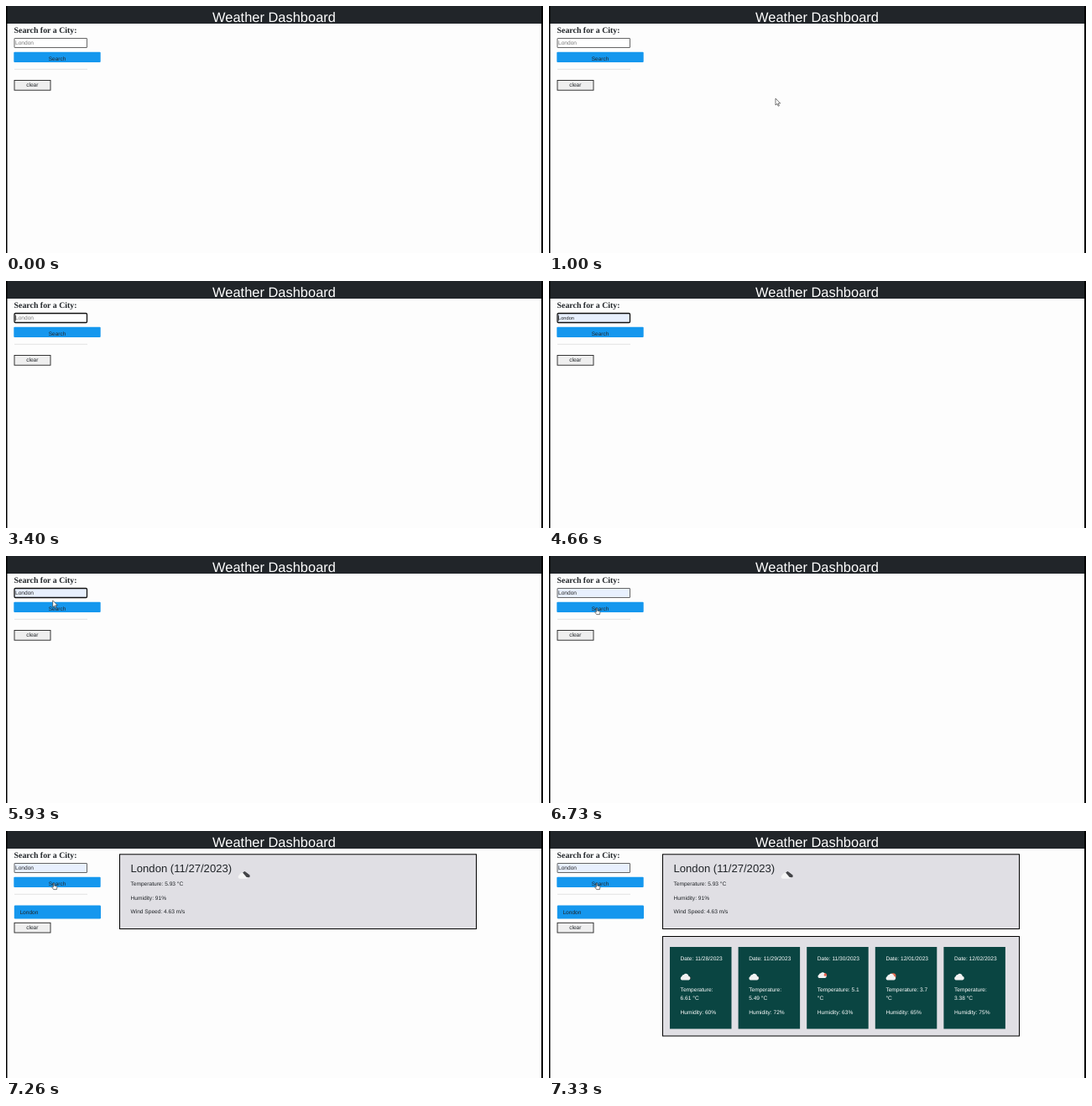
Recreate the animation shown at these times as an HTML page. Size 640 by 294 pixels, loop 8000 ms.

```html
<!DOCTYPE html>
<html lang="en">
<head>
<meta charset="utf-8">
<title>Weather Dashboard</title>
<style>
  html, body { margin: 0; width: 100%; height: 100%; overflow: hidden; background: #fdfdfd; }
  svg { display: block; width: 640px; height: 294px; }
  text { font-family: "Liberation Sans", Arial, sans-serif; font-size: 6.6px; fill: #212529; text-rendering: geometricPrecision; }
  .serif { font: bold 9.9px "Liberation Serif", "Times New Roman", serif; }
  .tile text { fill: #fff; }
  .mid { text-anchor: middle; }
  .button { fill: #1597ee; }
  .panel { fill: #e0dfe4; stroke: #000; }
</style>
</head>
<body>
<svg viewBox="0 0 640 294">
  <defs>
    <path id="cloud" d="M2.6 9.5a2.5 2.5 0 0 1 0-4.6 2.4 2.4 0 0 1 2.4-1.9 3.2 3.2 0 0 1 5.7 1.8 2.4 2.4 0 0 1 .2 4.7z"/>
  </defs>
  <rect width="640" height="294" fill="#fdfdfd"/>
  <rect width="640" height="21" fill="#212529"/>
  <path d="M0 0h1.5v294H0zM638 0h2v294h-2z"/>
  <text class="mid" x="319.5" y="19" style="font-size:16.45px;fill:#fff">Weather Dashboard</text>
  <text class="serif" x="9.5" y="32.2">Search for a City:</text>

  <rect id="field" x="10" y="38.5" width="86.5" height="11"/>
  <text id="value" x="11" y="46.3">London</text>
  <path id="caret" d="M11.5 40.5v7" stroke="#000" stroke-width=".6"/>

  <rect class="button" x="9.3" y="54.7" width="103.4" height="12.3" rx="1"/>
  <text class="mid" x="61" y="64.6" style="font-size:6.5px">Search</text>
  <path d="M10 75.3h87" stroke="#dcdcdc" stroke-width=".8"/>

  <g id="history">
    <rect class="button" x="9.8" y="88.5" width="103.2" height="16" rx="1.2"/>
    <text x="16.4" y="99.2">London</text>
  </g>
  <g id="clear">
    <rect x="10" y="88.5" width="43" height="11.7" fill="#efefef" stroke="#222" stroke-width=".9"/>
    <text class="mid" x="31.3" y="96.3">clear</text>
  </g>

  <g id="today">
    <rect class="panel" x="135.5" y="27.8" width="425" height="88.7"/>
    <text x="148.5" y="49.2" style="font-size:13.1px">London (11/27/2023)</text>
    <path d="M282 50l2.5-2 6 4.5v2.5l-3 .3z" fill="#444548"/>
    <use href="#cloud" x="275.6" y="47.3" fill="#f5f5f5"/>
    <path d="M282 49.5l2.5-1.3 5.8 4.5-.6 2.3-3 0z" fill="#444548"/>
    <text x="148.5" y="65">Temperature: 5.93 °C</text>
    <text x="148.5" y="81.7">Humidity: 91%</text>
    <text x="148.5" y="98.4">Wind Speed: 4.63 m/s</text>
  </g>
  <g id="forecast">
    <rect class="panel" x="135.5" y="125.5" width="425" height="118.5"/>
  </g>

  <g id="cursor" fill="#fff" stroke="#222" stroke-width=".6" stroke-linejoin="round">
    <path id="arrow" d="M0 0v8l1.9-1.7 1.3 2.9 1.2-.5-1.3-2.8h2.6z"/>
    <path id="hand" d="M-.6.4q.7-.8 1.3 0v2.8l2.6.6q.7.3.6 1l-.5 2.8H-.3l-2.1-2.9q.4-.9 1.8 0z"/>
  </g>
</svg>
<script>
const LOOP = 8000, STEP = 200 / 3;
const $ = id => document.getElementById(id);
const show = (id, on) => $(id).setAttribute('display', on ? 'inline' : 'none');
const set = (id, attrs) => {
  for (const name in attrs) $(id).setAttribute(name, attrs[name]);
};

const days = [
  ['11/28/2023', ['Temperature:', '6.61 °C'], 60, 'dark'],
  ['11/29/2023', ['Temperature:', '5.49 °C'], 72, 'dark'],
  ['11/30/2023', ['Temperature: 5.1', '°C'], 63, 'rain'],
  ['12/01/2023', ['Temperature: 3.7', '°C'], 65, 'sun'],
  ['12/02/2023', ['Temperature:', '3.38 °C'], 75, 'cloud']
];
const cloud = (x, y) => `<use href="#cloud" x="${x}" y="${y}" fill="#f2f2f2"/>`;
const icons = {
  dark: '<path d="M20 33l3 1.2 2.5 2.5-1 2-4-2z" fill="#343c3d"/>' + cloud(11.7, 30),
  rain: '<circle cx="21.3" cy="33.6" r="2.5" fill="#e8624f"/>' +
    `<g transform="translate(2 4) scale(.88)">${cloud(11.7, 28)}</g>` +
    '<circle cx="22" cy="33.3" r="1.5" fill="#e8624f"/><path d="M15.5 38l-.7 1.5m3.2-1.5l-.7 1.5" stroke="#39494a" stroke-width=".7"/>',
  sun: '<circle cx="21.3" cy="34.7" r="3.4" fill="#e96b50"/>' + cloud(11.7, 30),
  cloud: cloud(11.7, 30)
};

$('forecast').insertAdjacentHTML('beforeend', days.map(([date, temp, humidity, icon], i) => {
  const line = (text, y) => `<text x="12.6" y="${y}">${text}</text>`;
  return `<g class="tile" transform="translate(${144 + i * 81.6} 138)">
    <rect width="73.5" height="97.5" fill="#0a4542"/>${icons[icon]}
    ${line('Date: ' + date, 15.6)}${line(temp[0], 53)}${line(temp[1], 63)}
    ${line(`Humidity: ${humidity}%`, 79.6)}</g>`;
}).join(''));

// Cursor key points: time, x, y
const arrival = [[600, 516, 150], [1000, 270, 110], [1400, 95, 91], [1660, 65, 60]];
const toButton = [[5530, 54, 47], [5930, 56, 54], [6200, 57, 62]];

function along(path, t) {
  if (t <= path[0][0]) return path[0].slice(1);
  for (let i = 1; i < path.length; i++) {
    const [t0, x0, y0] = path[i - 1], [t1, x1, y1] = path[i];
    if (t <= t1) {
      const k = (t - t0) / (t1 - t0);
      return [x0 + (x1 - x0) * k, y0 + (y1 - y0) * k];
    }
  }
  return path[path.length - 1].slice(1);
}

function draw(t) {
  const focused = t >= 3400 && t < 6730;
  const filled = t >= 4660;
  const preview = filled && t < 5000;
  const searched = t >= 7200;

  set('field', {
    fill: filled ? '#e8f0fe' : '#fff',
    stroke: focused ? '#101010' : '#555',
    'stroke-width': focused ? 1.3 : .9,
    rx: focused ? 1.2 : .3
  });
  $('value').style.fontSize = preview ? '5.7px' : '6.6px';
  $('value').style.fill = filled ? '#222' : '#777';
  show('caret', (t >= 3400 && t < 3930) || (t >= 4460 && t < 5000));

  show('history', searched);
  set('clear', { transform: `translate(0 ${searched ? 20.8 : 0})` });
  show('today', t >= 7260);
  show('forecast', t >= 7330);

  const arriving = t >= 600 && t < 1730;
  const onButton = t >= 5530;
  show('cursor', arriving || onButton);
  const stepped = Math.floor(t / STEP + .01) * STEP;
  const [x, y] = along(onButton ? toButton : arrival, stepped);
  const hand = y >= 53.5 && y < 67 && x < 113;
  show('hand', hand);
  show('arrow', !hand);
  set('cursor', { transform: `translate(${x} ${y})` });
}

const start = performance.now();
function tick() {
  draw((performance.now() - start) % LOOP);
  requestAnimationFrame(tick);
}
tick();
</script>
</body>
</html>
```
